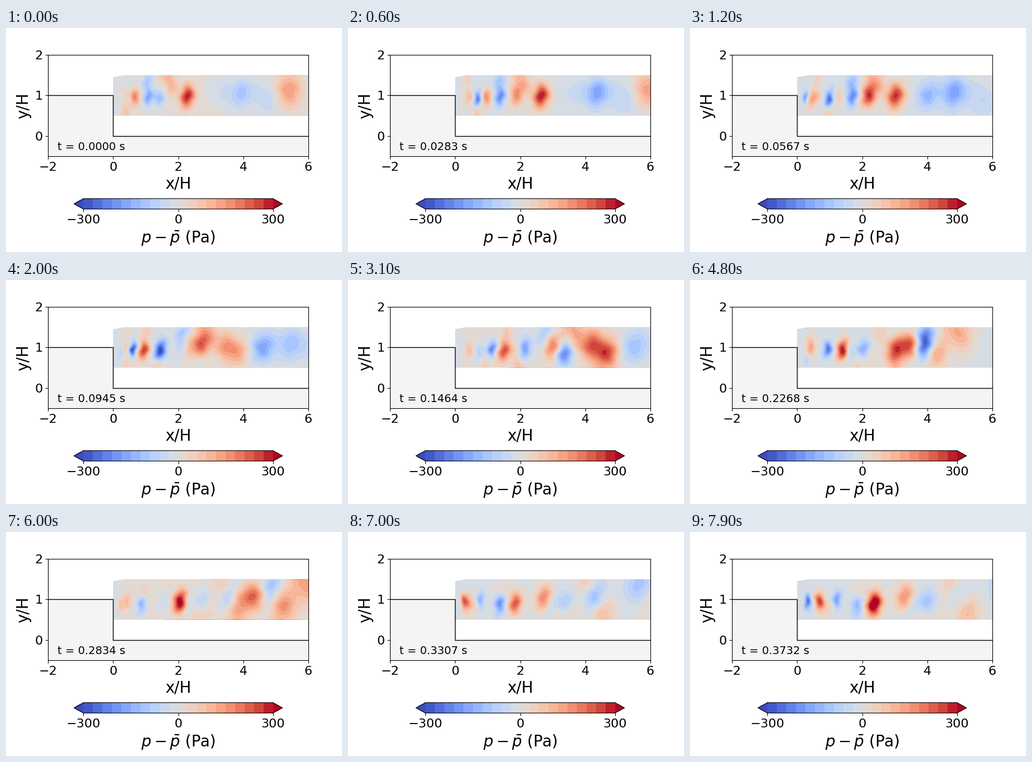
These frames come from a looping animation (600 px wide and 400 px high, 8 s). A matplotlib script:

```python
import numpy as np
import matplotlib.pyplot as plt
from matplotlib.animation import FuncAnimation
from matplotlib.path import Path

FRAMES, INTERVAL = 80, 100
SECONDS_PER_FRAME = 0.004724
LEVELS = np.linspace(-300, 300, 21)
SHEAR_Y = .95           # height of the shear layer behind the step
SPREAD, OFFSET = .0077, 5.4  # flow speed is SPREAD * (x + OFFSET)
LIFE = 12               # frames a strong vortex keeps its strength
TILT = .12

# Strong vortices: frame of peak strength, place at that time, pressure.
VORTICES = [
    (-6, 1.1, -150), (0, .68, 180), (0, 5.4, 140), (6, 2.65, 310),
    (8, 1.5, -210), (10, 4.67, -160), (12, .97, -310), (15, 2.38, 300),
    (21, 4.65, -150), (22, .7, -320), (24, 1.15, 260), (28, 1.95, -210),
    (31, 3.0, 210), (31, 4.2, 220), (31, 4.65, 260), (32, 3.4, -240),
    (46, .85, -250), (46, 3.78, -260), (48, 3.05, 190), (49, 2.1, -160),
    (52, 3.75, 280), (54, 1.72, 350), (55, 4.85, 150), (68, 4.15, -160),
    (69, 1.35, -230), (74, 3.0, 200), (78, .65, 240), (78, 1.15, -210),
    (78, 3.95, -130), (80, .38, -290), (80, 2.43, 380)]

rng = np.random.default_rng(4)
EDDIES = [(rng.uniform(-95, 75), rng.uniform(.5, 1.5), rng.normal(0, 40))
          for _ in range(45)]

# Extra rows hugging both edges resolve the thin rim.
xs = np.linspace(0, 6, 181)
ys = np.r_[.5, .512, np.linspace(.53, 1.47, 48), 1.488, 1.5]
X, Y = np.meshgrid(xs, ys)


def drift(x, frames):
    """Carry x downstream; the flow speeds up away from the step."""
    return (x + OFFSET) * np.exp(SPREAD * frames) - OFFSET


def blob(x, y, strength, X, Y):
    """Tilted Gaussian that widens downstream."""
    width, height = .07 + .037 * max(x, 0), .12 + .03 * max(x, 0)
    dy = Y - y
    dx = X - x - TILT * dy
    return strength * np.exp(-.5 * ((dx / width) ** 2 + (dy / height) ** 2))


def pressure_at(frame):
    origin = drift(X, -frame)
    wx = X + .02 * np.sin(17 * Y + 5 * origin)
    wy = Y + .02 * np.sin(11 * origin + 4 * Y)

    pulse = np.cos(2 * np.pi * (frame - 27) / 32)
    field = 6 * pulse + blob(.43, SHEAR_Y, 90, wx, wy)
    for peak, x, strength in VORTICES:
        age = frame - peak
        fade = np.exp(-(age / LIFE) ** 4)
        if fade > .01:
            here = drift(x, age)
            sway = .03 * here * np.sin(5 * x + peak)
            field += blob(here, SHEAR_Y + sway, fade * strength, wx, wy)
    for birth, y, strength in EDDIES:
        if frame > birth:
            field += blob(drift(0, frame - birth), y, strength, wx, wy)

    rim = 100 * max(pulse, 0) ** .5
    field[0, xs > 1.6] += rim
    field[-1, xs > 2.6] += .5 * rim
    inlet = np.clip(X / .22, 0, 1) ** 2
    return -15 + inlet * (field + 15)


fig, ax = plt.subplots(figsize=(6, 4), dpi=100, facecolor="white")
fig.subplots_adjust(bottom=.125)
ax.set(xlim=(-2, 6), ylim=(-.5, 2), xticks=range(-2, 7, 2), yticks=range(3))
ax.set_xlabel("x/H", fontsize=20)
ax.set_ylabel("y/H", fontsize=20)
ax.tick_params(labelsize=16)

ax.fill([-2, 0, 0, 6, 6, -2], [1, 1, 0, 0, -.5, -.5], color="#f4f4f4", lw=0)
ax.plot([-2, 0, 0, 6], [1, 1, 0, 0], color="black", lw=1)
clock = ax.text(-1.7, -.35, "", fontsize=14)
window = Path([(0, .5), (6, .5), (6, 1.5), (.33, 1.5), (0, 1.45), (0, .5)])


def draw_field(frame):
    contours = ax.contourf(X, Y, pressure_at(frame), LEVELS, cmap="coolwarm", extend="both")
    contours.set_clip_path(window, ax.transData)
    return contours


layer = [draw_field(0)]
bar = fig.colorbar(layer[0], ax=ax, orientation="horizontal", shrink=.8, pad=.25,
                   ticks=[-300, 0, 300])
bar.ax.tick_params(labelsize=16)
bar.set_label(r"$p-\bar{p}$ (Pa)", fontsize=20)


def update(frame):
    layer.pop().remove()
    layer.append(draw_field(frame))
    clock.set_text(f"t = {frame * SECONDS_PER_FRAME:.4f} s")
    return layer + [clock]


anim = FuncAnimation(fig, update, frames=FRAMES, interval=INTERVAL,
                     init_func=lambda: [], repeat=True, repeat_delay=0)
plt.show()
```
